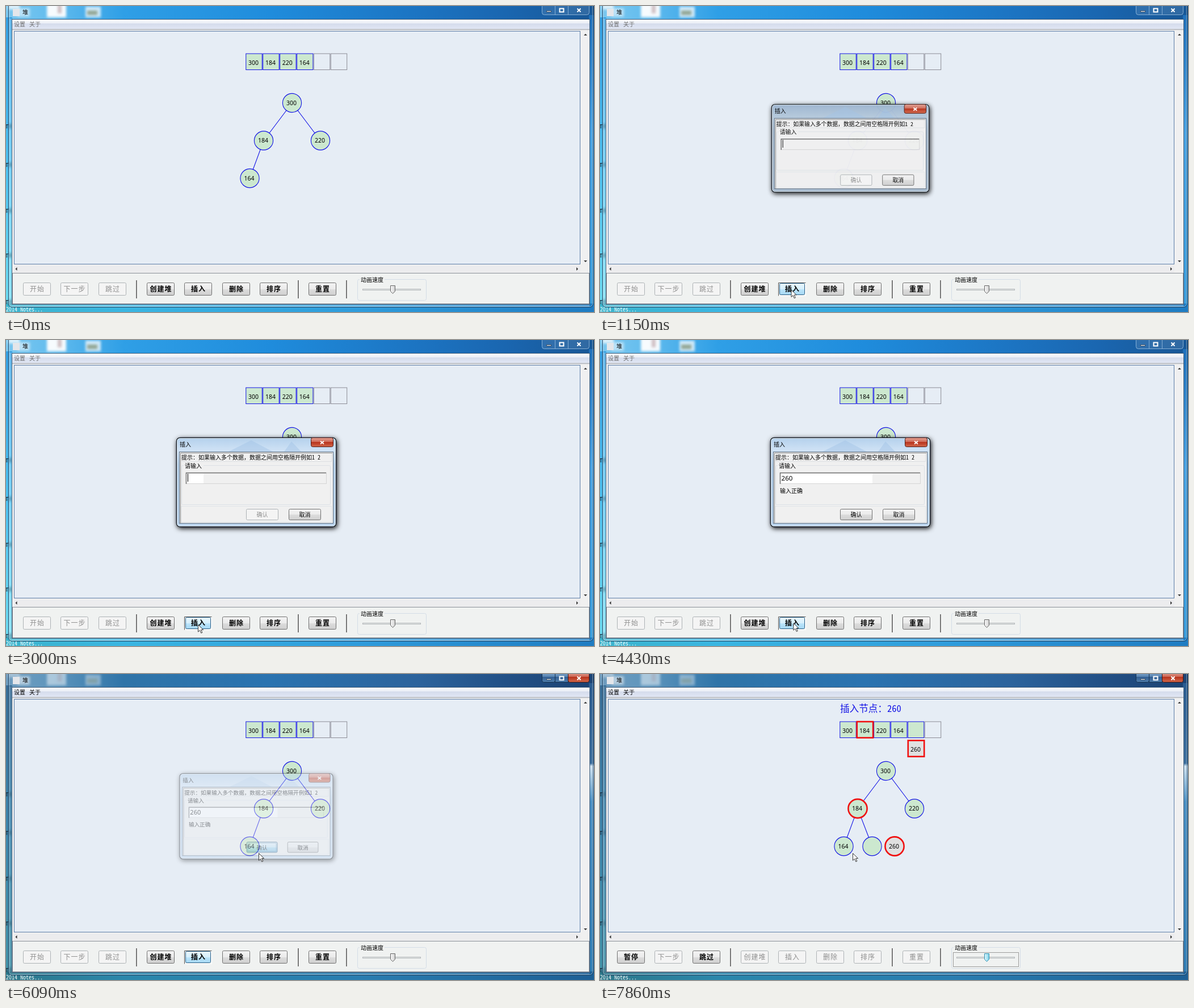
Write an HTML page that moves like this. It is 1036x540 px and loops after 8 s.

```html
<!DOCTYPE html>
<html lang="zh-CN">
<head>
<meta charset="utf-8">
<title>堆</title>
<style>
html, body { margin: 0; width: 100%; height: 100%; overflow: hidden; }
svg { display: block; width: 1036px; height: 540px; }
text { font-family: "Noto Sans Mono CJK SC", "Noto Sans CJK SC", "Noto Sans CJK", sans-serif; font-size: 10px; white-space: pre; }
.num { font-family: "Noto Sans", "Open Sans", sans-serif; font-size: 10.5px; text-anchor: middle; }
.btn { font-size: 12px; font-weight: bold; letter-spacing: 1px; text-anchor: middle; }
.off { font-weight: 500; }
.mid { text-anchor: middle; }
.head { font-size: 16.6px; }
</style>
</head>
<body>
<svg viewBox="0 0 1036 540" xmlns="http://www.w3.org/2000/svg">
<defs id="defs"></defs>
<g id="stage"></g>
</svg>
<script>
const LOOP = 8000;
const STEPS = [0, 400, 550, 700, 850, 1000, 1150, 1300, 1450, 2040, 2570,
  3000, 3140, 3285, 3430, 3570, 3850, 4000, 4430,
  4860, 4997, 5134, 5271, 5408, 5545, 5682, 5820,
  5970, 6107, 6244, 6381, 6518, 6655, 6792, 6930,
  7050, 7185, 7320, 7455, 7590, 7725, 7860];

// Pointer stops: time, x, y
const PATH = [[400, 362, 522], [700, 340, 504], [850, 337, 501], [1150, 336.5, 500.5],
  [1300, 336.5, 500.5], [1450, 338, 502], [3285, 338, 502], [3430, 339, 502],
  [4860, 341, 498], [5682, 445, 311.5], [5820, 445, 311.5], [5970, 445, 316]];

const BLUE = '#1414e6', GREEN = '#cce8cf', GREY = '#e0e0e0', RED = '#f01010';

const gradient = (id, stops, across) =>
  `<linearGradient id="${id}" x1="0" y1="0" x2="${across ? 1 : 0}" y2="${across ? 0 : 1}">` +
  stops.map(([at, color]) => `<stop offset="${at}" stop-color="${color}"/>`).join('') + '</linearGradient>';

document.getElementById('defs').innerHTML =
  gradient('idle', [[0, '#7cc8ef'], [.08, '#62bcee'], [.2, '#2f9fe6'], [.45, '#1f8cdc'], [.7, '#1c74c2'], [.85, '#1a66b0'], [1, '#185796']], true) +
  gradient('live', [[0, '#6f9cbe'], [.08, '#5f96bd'], [.2, '#2f74a8'], [.45, '#2a73b0'], [.7, '#2c639c'], [.85, '#225086'], [1, '#1c4272']], true) +
  gradient('idleSide', [[0, '#36a0e2'], [.5, '#4fc0ee'], [1, '#6fdcf0']]) +
  gradient('liveSide', [[0, '#3a6f98'], [.5, '#3f87ad'], [1, '#4494a8']]) +
  gradient('idleEdge', [[0, '#1f70bb'], [.4, '#4aa4e4'], [1, '#3a9edc']]) +
  gradient('liveEdge', [[0, '#2a5b90'], [.27, '#3d6f9e'], [.28, '#d0e2f0'], [.4, '#4a90c4'], [1, '#2f7db4']]) +
  gradient('idleBase', [[0, '#3cb4cc'], [.2, '#3ab6e2'], [.6, '#2f9cdc'], [1, '#1f7cc2']], true) +
  gradient('liveBase', [[0, '#2c7789'], [.2, '#2b87ab'], [.6, '#2a7db0'], [1, '#1d5f95']], true) +
  gradient('menu', [[0, '#ffffff'], [.4, '#e9edf6'], [.45, '#d5dcec'], [1, '#e0e6f4']]) +
  gradient('plain', [[0, '#f3f3f3'], [.5, '#ebebeb'], [.51, '#dddddd'], [1, '#cfcfcf']]) +
  gradient('hot', [[0, '#e8f5fc'], [.5, '#c4e5f6'], [.51, '#a0d5f0'], [1, '#72b9de']]) +
  gradient('lit', [[0, '#e8f6fd'], [.5, '#d6effc'], [.51, '#bce5fb'], [1, '#a6d8f3']]) +
  gradient('close', [[0, '#e3a396'], [.48, '#cd6552'], [.5, '#b8331c'], [1, '#d2694c']]) +
  gradient('cap', [[0, '#7ea5cb'], [.48, '#5783b1'], [.5, '#335f92'], [1, '#4f7fae']]) +
  gradient('glass', [[0, '#b3d0ec'], [.14, '#cfe2f5'], [.3, '#b4cfe9'], [1, '#bcd5ee']]) +
  gradient('glassDim', [[0, '#9db5cf'], [.14, '#b4c8dc'], [.3, '#a3b7cb'], [1, '#a9bccf']]) +
  gradient('thumb', [[0, '#fafafa'], [1, '#cfcfcf']], true) +
  gradient('thumbHot', [[0, '#e2f8fd'], [1, '#7bd2ea']], true) +
  '<filter id="blur" x="-50%" y="-50%" width="200%" height="200%"><feGaussianBlur stdDeviation="2"/></filter>' +
  '<filter id="shade" x="-20%" y="-20%" width="140%" height="150%"><feDropShadow dx="1.5" dy="2.5" stdDeviation="4.5" flood-opacity=".95"/></filter>';

const fill = (x, y, w, h, color, extra = '') =>
  `<rect x="${x}" y="${y}" width="${w}" height="${h}" fill="${color}" ${extra}/>`;
const frame = (x, y, w, h, color, stroke, extra = '') =>
  fill(x + .5, y + .5, w - 1, h - 1, color, `stroke="${stroke}" ${extra}`);
const label = (x, y, str, color = '#000', cls = '') =>
  `<text x="${x}" y="${y}" fill="${color}" class="${cls}">${str}</text>`;
const path = (d, color, stroke = 'none', extra = '') =>
  `<path d="${d}" fill="${color}" stroke="${stroke}" ${extra}/>`;
const smudge = (x, y, w, h, color, alpha) =>
  fill(x, y, w, h, color, `opacity="${alpha}" filter="url(#blur)"`);

function desktop(live) {
  const kind = live ? 'live' : 'idle', soft = live ? .5 : 1;
  let s = fill(0, 0, 1036, 540, `url(#${kind})`) +
    fill(0, 20, 11, 520, `url(#${kind}Side)`) +
    fill(1027, 16, 9, 524, `url(#${kind}Edge)`) +
    fill(0, 525, 1036, 15, `url(#${kind}Base)`);
  s += fill(5, 22, 5, 508, '#fff', `opacity="${.25 * soft}"`) + fill(10, 526, 1018, 5, '#fff', `opacity="${.25 * soft}"`);
  s += smudge(4, -3, 20, 9, '#fff', .75 * soft) + smudge(72, -4, 34, 24, '#fff', .95 * soft) +
    smudge(140, 1, 27, 19, '#fff', .75 * soft) + smudge(91, -2, 7, 15, '#9a6a70', .4 * soft) +
    smudge(143, 8, 18, 8, '#6d7d56', .6 * soft) + smudge(20, 4, 22, 15, '#fff', .5);
  [212, 280, 361, 440, 522].forEach(y => {
    s += fill(0, y - 3, 4, 1, '#123') + fill(1, y - 3, 1, 7, '#123') + smudge(5, y - 4, 4, 8, '#2a4658', .6);
  });
  return s + label(0, 539, '2014 Notes...', '#fff');
}

function chrome(live) {
  let s = frame(4, -8, 1031, 540, 'none', '#10304f', 'rx="6" stroke-opacity=".85"') +
    frame(5, -8, 1029, 539, 'none', '#d8f0ff', 'rx="5" stroke-opacity=".5"') +
    frame(10, 23, 1019, 504, '#f0f0f0', '#3c5a78');
  s += fill(12, 5, 12, 13, '#e4e6ea') + label(29, 15, '堆');
  s += live
    ? frame(944, -4, 24, 19, 'url(#cap)', '#16324f', 'rx="3"') + frame(967, -4, 24, 19, 'url(#cap)', '#16324f') +
      frame(990, -4, 38, 19, 'url(#close)', '#4a1712', 'rx="3"')
    : frame(944, -4, 84, 20, '#fff', '#b9d6ee', 'rx="4" fill-opacity=".1" stroke-opacity=".65"') +
      fill(967, 0, 1, 15, '#b9d6ee', 'opacity=".6"') + fill(990, 0, 1, 15, '#b9d6ee', 'opacity=".6"');
  s += frame(952, 8, 9, 3, '#fff', '#3a5068') + frame(975, 4, 8, 7, 'none', '#fff', 'stroke-width="2"') +
    path('M1006.5 4.500l6 6m0-6l-6 6', 'none', '#fff', 'stroke-width="2"');
  s += fill(11, 24, 1017, 16, 'url(#menu)') + fill(11, 40, 1017, 1, '#d0d4dc') +
    fill(11, 41, 1017, 1, '#b0b4bc') + fill(11, 42, 1017, 1, '#e0e0e2');
  const ink = live ? '#000' : '#6d6d6d';
  s += label(14, 36, '设置', ink) + label(41, 36, '关于', ink);
  s += frame(14, 44, 998, 412, '#e6edf5', '#5c7da8');
  s += fill(1013, 44, 15, 412, '#f0f0f1') + fill(14, 457, 998, 14, '#ececee') +
    path('M1018 52h6l-3-3zM1018 449h6l-3 3zM19.500 461v6l-3-3zM1005 461v6l3-3z', '#333');
  return s + frame(11, 471, 1017, 55, '#f0f2f1', '#8a9098');
}

function button(x, str, on) {
  return frame(x, 488, 49, 23, on ? 'url(#plain)' : '#f4f4f4', on ? '#707070' : '#adb2b5', 'rx="2"') +
    label(x + 25, 503.5, str, on ? '#000' : '#8f8f8f', on ? 'btn' : 'btn off');
}

function toolbar(running, pressed) {
  let s = button(30, running ? '暂停' : '开始', running) + button(96, '下一步', false) + button(163, '跳过', running);
  s += button(248, '创建堆', !running);
  s += pressed
    ? path('M314.500 511.500V488.500H362.500', 'none', '#555') + path('M315 511.500H362.500V489', 'none', '#fff') +
      frame(316, 489, 45, 21, `url(#${pressed})`, '#2c628b', 'rx="2"') + label(339, 503.5, '插入', '#000', 'btn')
    : button(314, '插入', !running);
  s += button(381, '删除', !running) + button(447, '排序', !running) + button(533, '重置', !running);
  [229, 514, 599].forEach(x => s += fill(x, 484, 2, 32, '#777') + fill(x + 2, 484, 1, 32, '#fff'));
  s += frame(619, 482, 122, 38, 'none', '#d3dce6', 'rx="3"') + fill(623, 479, 44, 8, '#f0f2f1') + label(625, 487, '动画速度');
  s += frame(628, 499, 103, 3, '#e8eaea', '#b4b8ba');
  if (running) s += frame(622, 491, 116, 26, 'none', '#444', 'stroke-dasharray="1 1"');
  return s + path('M677.500 493.500h8v10l-4 4l-4-4z', `url(#thumb${running ? 'Hot' : ''})`, running ? '#2d8fb0' : '#666');
}

const cell = (cx, cy, str, color, line, red) =>
  `<rect x="${cx - 14.2}" y="${cy - 14.2}" width="28.4" height="28.4" fill="${color}" stroke="${red ? RED : line}" stroke-width="${red ? 2.6 : 1}"/>` +
  label(cx - 1, cy + 5.8, str, '#000', 'num');
const ball = (cx, cy, str, color, red) =>
  `<circle cx="${cx}" cy="${cy}" r="${red ? 16.6 : 16.6}" fill="${color}" stroke="${red ? RED : BLUE}" stroke-width="${red ? 2.6 : 1.1}"/>` +
  label(cx - 1, cy + 3.8, str, '#000', 'num');

function heap(running, move, red) {
  let s = running ? label(423, 67, '插入节点：260', BLUE, 'head') : '';
  [300, 184, 220, 164, '', ''].forEach((v, i) => {
    const used = i < (running ? 5 : 4);
    s += cell(437 + 29.9 * i, 98.3, v, used ? GREEN : 'none', used ? BLUE : '#8c8c96', false);
  });
  if (red) s += cell(466.9, 98.3, 184, GREEN, BLUE, true);
  s += path('M504 171L454 237.500L429.500 304M504 171L554 237.500' + (running ? 'M454 237.500L479.500 304' : ''), 'none', BLUE, 'stroke-width="1.1"');
  s += ball(504, 171, 300, GREEN) + ball(454, 237.5, 184, GREEN, red) + ball(554, 237.5, 220, GREEN) + ball(429.5, 304, 164, GREEN);
  if (running) {
    const from = (x, y) => [542 + (x - 542) * move, 64 + (y - 64) * move];
    s += ball(479.5, 304, '', GREEN) + cell(...from(557, 131.5), 260, GREY, BLUE, red) + ball(...from(519, 304), 260, GREY, red);
  }
  return s;
}

function dialog(t) {
  const opening = t === 1150, closing = t === 5970;
  const typed = t < 3570 ? '' : t < 3850 ? '2' : t < 4000 ? '26' : '260';
  const ok = typed !== '', down = t >= 5545;
  const caret = t < 5545 && !(t >= 2040 && t < 2570) && !(t >= 4430 && t < 4860) && t !== 5408;
  const small = (x, str, on, hot) =>
    frame(x, 298, 57, 20, hot ? 'url(#hot)' : on ? 'url(#plain)' : '#f4f4f4', hot ? '#1f4f74' : on ? '#707070' : '#adb2b5', 'rx="2"') +
    (hot ? frame(x + 2, 300, 53, 16, 'none', '#2c628b', 'stroke-dasharray="1 1"') : '') +
    label(x + 28.5, 312, str, on ? '#000' : '#8f8f8f', 'mid');
  let s = frame(300, 172, 282, 158, `url(#glass${opening ? 'Dim' : ''})`, '#10161e', 'rx="6" stroke-width="1.4" filter="url(#shade)"') +
    frame(301, 173, 280, 156, 'none', '#fff', 'rx="5" stroke-opacity=".65"') +
    path('M392 197L432 177L470 197M490 197L503 179L520 197', '#9fc0e4', 'none', 'opacity=".45"') +
    label(306, 188, '插入') +
    frame(537, 172, 40, 17, 'url(#close)', '#541d17', 'rx="3"') +
    path('M554 178.500l6 5m0-5l-6 5', 'none', '#fff', 'stroke-width="1.8"');
  s += frame(305, 197, 272, 127, '#f0f0f0', '#5d6f82') + path('M307.500 323V199.500H575', 'none', '#8b8b8b') +
    label(309, 211, '提示：如果输入多个数据，数据之间用空格隔开例如1 2') +
    path('M309 214.500H573.500V200', 'none', '#dcdfe2') +
    frame(309, 221, 263, 70, 'none', '#dce1e6', 'rx="2"') + fill(313, 217, 35, 10, '#f0f0f0') + label(315, 226, '请输入') +
    frame(308, 293, 266, 29, 'none', '#e0e4e8');
  s += frame(317, 234, 248, 20, '#f0f0f0', '#d5d5d5');
  if (t >= 1450) s += fill(318, 236, ok ? 162 : 30, 17, '#fff');
  s += path('M317.500 254V234.500H564', 'none', '#707070', 'stroke-width="1.5"');
  s += `<text x="319.500" y="248" class="num" style="font-size:11.6px;text-anchor:start">${typed}</text>`;
  if (caret) s += fill(320 + 6.5 * typed.length, 236, 1, 14, '#000');
  if (ok) s += label(317, 270, '输入正确');
  s += small(423, '确认', ok, down) + small(498, '取消', true, false);
  const fade = (alpha, size) =>
    `<g opacity="${alpha}" transform="translate(440.500 251) scale(${size}) translate(-440.500 -251)">${s}</g>`;
  return opening ? fade(.97, .986) : closing ? fade(.4, .96) : s;
}

function pointer(t) {
  if (t < 400) return '';
  let i = PATH.findIndex(p => p[0] > t);
  if (i < 0) i = PATH.length;
  const a = PATH[i - 1], b = PATH[i] || a;
  const k = b === a ? 0 : (t - a[0]) / (b[0] - a[0]);
  const x = a[1] + (b[1] - a[1]) * k, y = a[2] + (b[2] - a[2]) * k;
  const hand = t >= 700 && t < 1150;
  const shape = hand
    ? path('M-1 1q1.500-1.500 2.500 0v6l1.500-.6 1.200.8 1.500-.3 1 .9 1.300.2v5l-1.500 4.500h-6.500l-4.500-6q-.5-2 1.500-1.500l2 1.500z', '#fff', '#111')
    : path('M.5.5v12.500l3-2.800 2.300 5 2-.9-2.200-4.900h4z', '#fff', '#222', 'stroke-width=".9"');
  return `<g transform="translate(${x} ${y})">${shape}</g>`;
}

function draw(t) {
  const live = (t >= 850 && t < 1150) || t >= 5970;
  const running = t >= 6107;
  const pressed = t < 850 || running ? '' : t < 1150 ? 'hot' : 'lit';
  const move = Math.min(1, (t - 6107) / 1073);
  const red = t >= 7320 && Math.round((t - 7320) / 135) % 2 === 0;
  return desktop(live) + chrome(live) + toolbar(running, pressed) + heap(running, move, red) +
    (t >= 1150 && !running ? dialog(t) : '') + pointer(t);
}

const stage = document.getElementById('stage');
const start = performance.now();
let shown = -1;
function tick() {
  const now = (performance.now() - start) % LOOP;
  const t = STEPS.findLast(s => s <= now);
  if (t !== shown) stage.innerHTML = draw(shown = t);
  requestAnimationFrame(tick);
}
tick();
</script>
</body>
</html>
```
